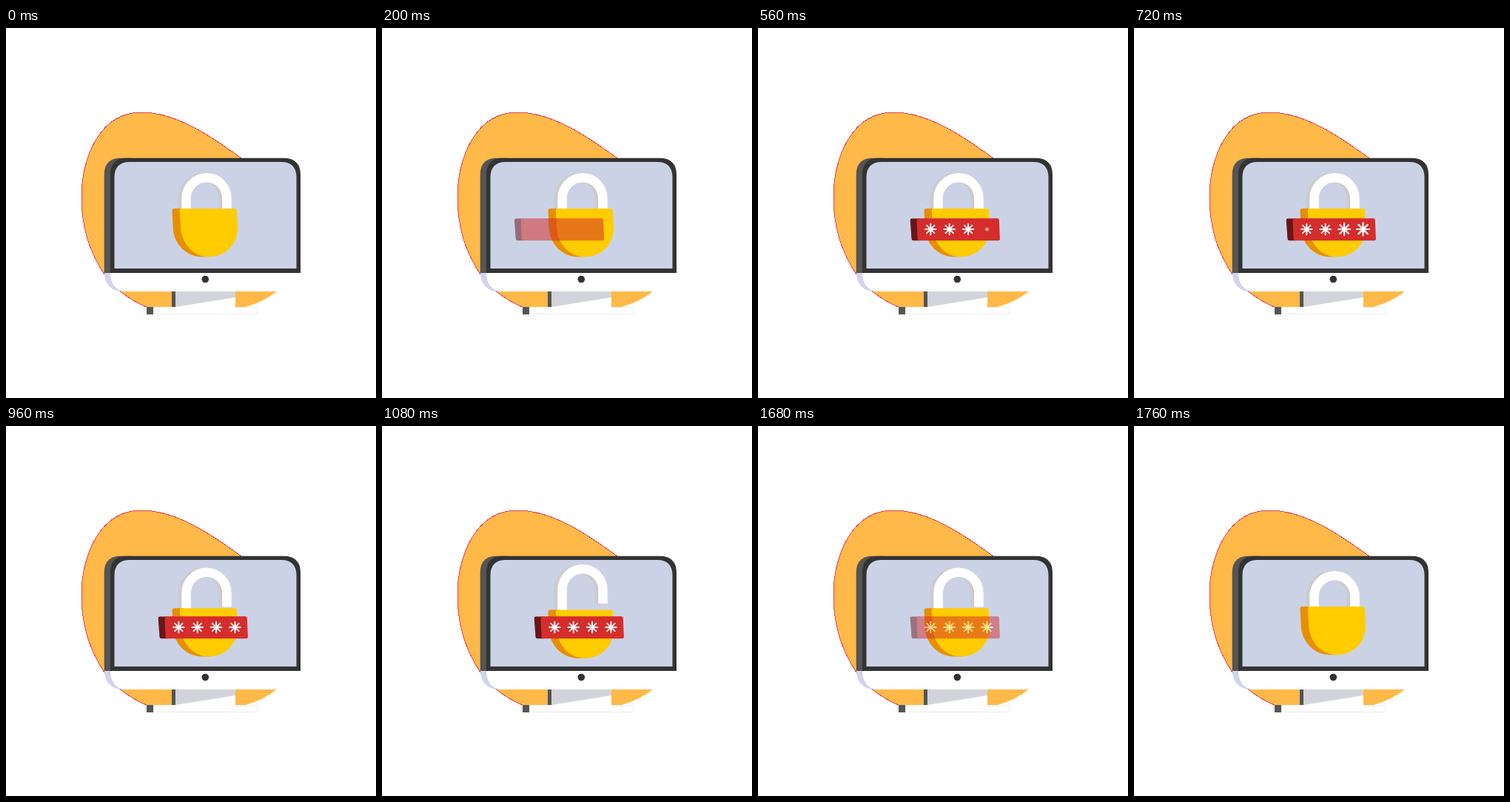
These frames come from a looping animation (500 px wide and 500 px high, 2.82 s). An HTML page:

```html
<!DOCTYPE html>
<html lang="en">
<head>
<meta charset="utf-8">
<title>Password unlock</title>
<style>
  html, body { margin: 0; width: 100%; height: 100%; overflow: hidden; background: #fff; }
  svg { display: block; width: 100%; height: 100%; }
</style>
</head>
<body>
<svg viewBox="0 0 500 500">
  <defs>
    <path id="arch" d="M242.500 280V230.500a27.500 28.300 0 0 1 55 0V249" fill="none" stroke-width="12.500"/>
    <path id="star" d="M-7.300 0H7.300M0-7.300V7.300M-5.200-5.200 5.200 5.200M-5.200 5.200 5.200-5.200"
          stroke="#fff" stroke-width="1.900" stroke-linecap="round"/>
  </defs>

  <!-- backdrop -->
  <g shape-rendering="crispEdges">
    <path fill="#ffb948" d="M318 176C277 146 230 113.500 183 113.500C125 113.500 101.500 178 101.500 228C101.500 270 114 305 133 333C147 353 168 368 192 378H320C338 373.500 354 365.500 366 356Z"/>
    <path fill="none" stroke="#e0405a" d="M318 176C277 146 230 114 183 114C125 114 102 178 102 228C102 270 114 305 133 333C147 353 168 368 192 378"/>
  </g>

  <!-- stand -->
  <path fill="#555" d="M224 355h6v22h-6zM190 377h9v10h-9z"/>
  <path fill="#d3d3db" d="M229 355h81v22H229z"/>
  <path fill="#fff" d="M229 377L310 364V377zM199 377h141v10H199z"/>
  <path fill="none" stroke="#e6e6e6" stroke-width=".7" d="M309 377.500h30.500v9H199"/>

  <!-- monitor -->
  <path fill="#555" d="M132.700 331V198Q132.700 175.700 155 175.700H170V331z"/>
  <path fill="#333" d="M141 331V198Q141 175.700 163 175.700H375Q398 175.700 398 198.500V331z"/>
  <path fill="#ccd2e6" d="M146.500 325V202Q146.500 181 167.500 181H371.500Q392.500 181 392.500 202V325z"/>
  <path fill="#d0d5ec" d="M133 331H170V356H158C143 356 133 346 133 331z"/>
  <path fill="#fff" d="M141 331H398C398 346 388 356 373 356H160C149 355 141 345 141 331z"/>
  <circle cx="269.300" cy="339.500" r="4.800" fill="#333"/>

  <!-- padlock -->
  <g id="shackle">
    <use href="#arch" x="-4" stroke="#cccccf"/>
    <use href="#arch" x="1" stroke="#fff"/>
  </g>
  <g id="body">
    <path fill="#e68f00" d="M227 244H240L275 309.300H265C244 309.300 226.500 292 225.700 270L224.500 247Q224.500 244 227 244z"/>
    <path fill="#fc0" d="M237 244H309Q311.700 244 311.900 247L313.100 270C313.400 292 296.500 309.300 274 309.300C254 309.300 237.200 292 236.200 270L234.700 247Q234.700 244 237 244z"/>
  </g>

  <!-- password bar -->
  <g id="bar">
    <path fill="#69161a" d="M207.500 257.500H218V287.300H210Q207.700 287.300 207.500 285L205.700 260Q205.600 257.500 207.500 257.500z"/>
    <path fill="#d42d2c" d="M217 257.300H323.500Q325.600 257.300 325.800 259.500L326.900 285Q326.900 287.300 324.800 287.300H217.500Q215.700 287.300 215.500 285L214.500 259.700Q214.500 257.300 217 257.300z"/>
    <g id="stars"></g>
  </g>
</svg>
<script>
const LOOP = 2820, STEP = 20;
const $ = id => document.getElementById(id);
const ramp = (t, a, b) => Math.min(1, Math.max(0, (t - a) / (b - a)));
const smooth = x => x * x * (3 - 2 * x);
const move = (el, x, y, s = 1) =>
  el.setAttribute('transform', `translate(${x} ${y}) scale(${s})`);

const stars = [0, 1, 2, 3].map(() => {
  const star = document.createElementNS('http://www.w3.org/2000/svg', 'use');
  star.setAttribute('href', '#star');
  return $('stars').appendChild(star);
});

function draw(t) {
  const enter = ramp(t, 60, 320);
  move($('bar'), -58 * (1 - enter), 0);
  $('bar').setAttribute('opacity', enter * (1 - ramp(t, 1600, 1760)));

  // each star pops in, then a quick pulse runs along the row
  stars.forEach((star, i) => {
    const typed = ramp(t, 360 + 60 * i, 420 + 60 * i);
    const pulse = Math.sin(Math.PI * ramp(t, 600 + 20 * i, 700 + 20 * i));
    move(star, 233.3 + 25.4 * i, 272, typed + 0.19 * pulse);
  });

  const open = smooth(ramp(t, 840, 1080)) - smooth(ramp(t, 1600, 1760));
  move($('shackle'), 0, -9 * open);
  move($('body'), 0, 4.6 * open);
}

const start = performance.now();
function tick() {
  const t = (performance.now() - start) % LOOP;
  draw(Math.floor(t / STEP) * STEP);
  requestAnimationFrame(tick);
}
tick();
</script>
</body>
</html>
```
